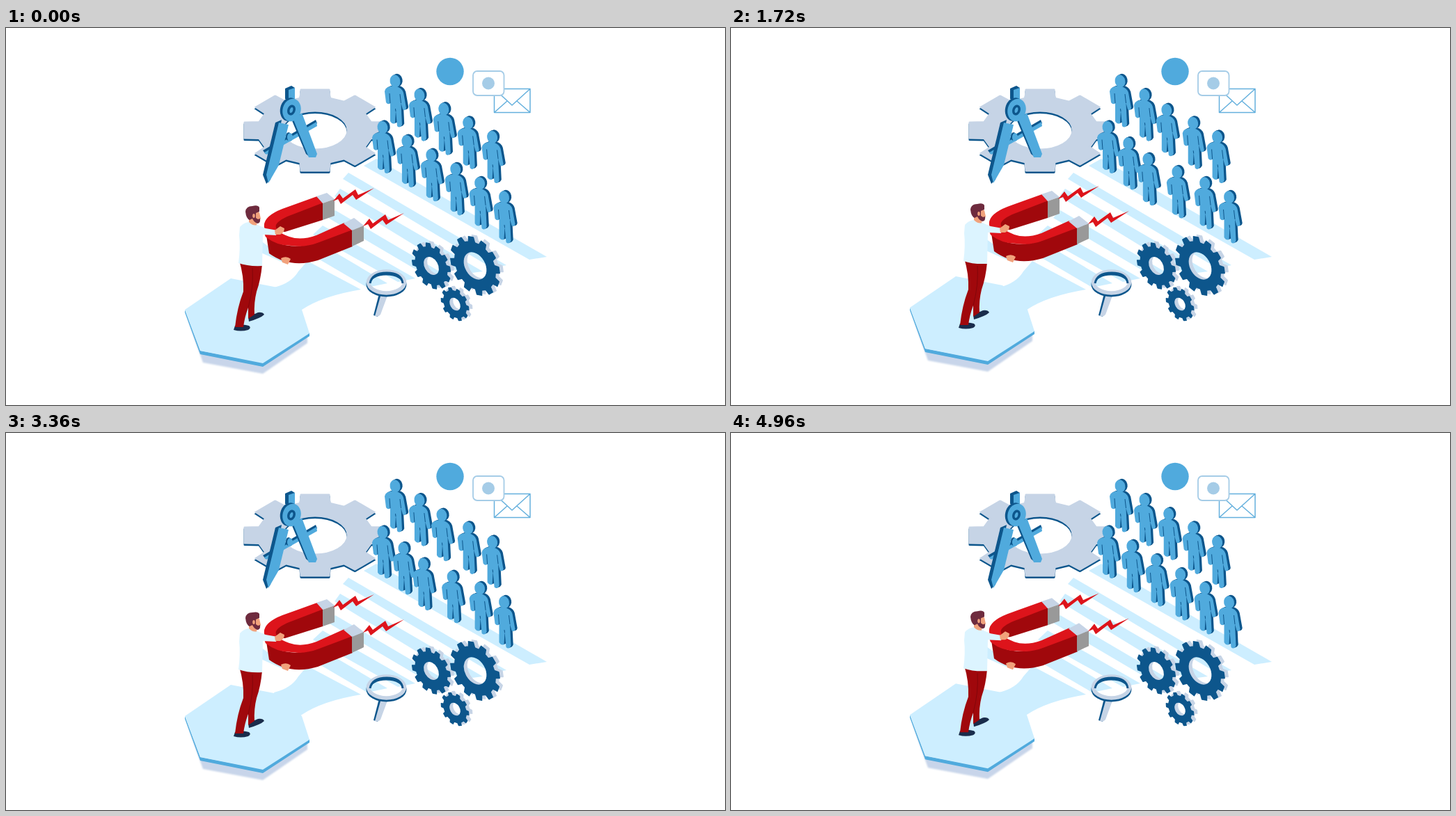
Write an HTML page that moves like this. It is 1033x542 px and loops after 5 s.

```html
<!DOCTYPE html>
<html lang="en">
<head>
<meta charset="utf-8">
<title>Magnet</title>
<style>
html, body { margin: 0; width: 100%; height: 100%; overflow: hidden; background: #fff; }
svg { display: block; width: 100%; height: 100%; }
.ice { fill: #cdeeff; }
.sky { fill: #50aadd; }
.navy { fill: #0d568c; }
.mist { fill: #c6d4e6; }
.red { fill: #dd141b; }
.wine { fill: #a0080c; }
.skin { fill: #f1a27c; }
.hair { fill: #6e2b3e; }
.shoe { fill: #1a2c4b; }
.line { fill: #fff; stroke: #64b0dd; stroke-width: 1.5; stroke-linejoin: round; }
</style>
</head>
<body>
<svg viewBox="0 0 1033 542">
  <defs>
    <g id="shape">
      <ellipse cx="-1" cy="10.500" rx="7.400" ry="9.200" transform="rotate(-12 -1 10.500)"/>
      <path d="M-13 20Q-6 16 0 18Q9 20 11 27L15 49Q14 54 10 51L7.500 42L9 73Q6 79 2 75L0 53L-1 71Q-5 73 -8 68L-8 42Q-11 45 -14 41L-16 25Q-15 21 -13 20Z"/>
    </g>
    <g id="person">
      <use href="#shape" x="3.200" y="-1.500" class="navy"/>
      <use href="#shape" x="1.500" y="-.8" class="navy"/>
      <use href="#shape" class="sky"/>
      <path d="M-9 28L-8 42M6 29L7.500 42M-.5 50L0 54" fill="none" stroke="#0d568c" stroke-width="1"/>
    </g>
    <path id="bolt" class="red" d="M470 249L479 238L484 245L502 232L506 240L529 230L503 247L498 240L481 253L477 246Z"/>
    <filter id="soft" x="-10%" y="-20%" width="120%" height="140%"><feGaussianBlur stdDeviation="1.3"/></filter>
  </defs>

  <g class="ice">
    <path d="M514 198L532 188L777 329L752 333Z"/>
    <path d="M492 208L719 341L698 345L484 217Z"/>
    <path d="M480 231L685 350L655 354L472 242Z"/>
    <path d="M473 262L633 356L609 359L463 273Z"/>
    <path d="M455 284L588 360L563 365L441 297Z"/>
    <path d="M448 308L548 367L519 373L437 325Z"/>
    <path d="M385 373Q410 367 420 350L433 335L510 376Q455 385 425 405L400 420Z"/>
  </g>

  <g id="disc"></g>

  <g id="compass">
    <path class="navy" d="M369 176L445 132L447 137L373 181Z"/>
    <path class="sky" d="M371 179L446 135L447 141L374 182Z"/>
    <path class="navy" d="M410 131L417 126L437 186L431 181Z"/>
    <path class="sky" d="M413 132L425 122L447 181L445 186L435 186Z"/>
    <path class="navy" d="M387 136L396 132L380 218L374 224L369 211Z"/>
    <path class="sky" d="M392 136L406 139L392 197L377 223L374 211Z"/>
    <ellipse class="navy" cx="406" cy="156" rx="4" ry="6"/>
    <ellipse class="sky" cx="408" cy="157" rx="4" ry="6"/>
    <path class="navy" d="M401 87L410 83L415 86L405 104L401 102Z"/>
    <path class="sky" d="M406 89L415 86L415 106L406 106Z"/>
    <ellipse class="navy" cx="407" cy="117" rx="13" ry="17" transform="rotate(14 407 117)"/>
    <ellipse class="sky" cx="410.500" cy="118" rx="13" ry="16.500" transform="rotate(14 410.500 118)"/>
    <ellipse cx="410" cy="118" rx="4" ry="6" transform="rotate(18 410 118)" fill="#50aadd" stroke="#0d568c" stroke-width="3.500"/>
  </g>

  <circle class="sky" cx="638" cy="62.500" r="19.700"/>
  <path class="line" d="M701.500 87.500H753V121.500H701.500ZL727 111L753 87.500M701.500 121.500L720 105M753 121.500L734 105"/>
  <rect x="671" y="62" width="44.500" height="35" rx="6" fill="#fff" stroke="#a5cce7" stroke-width="1.800"/>
  <circle cx="693" cy="79.500" r="9" fill="#a5cce7"/>

  <g id="crowd"></g>
  <g id="cogs"></g>

  <g id="lens">
    <path class="navy" d="M536 382L543 384L534 415L528 413Z"/>
    <path class="mist" d="M539 382L548 385L538 412Q535 416 530 414Z"/>
    <ellipse cx="546.500" cy="368.500" rx="26.500" ry="15.500" fill="none" stroke="#0d568c" stroke-width="5"/>
    <ellipse cx="546.500" cy="365.500" rx="26" ry="15.500" fill="none" stroke="#c6d4e6" stroke-width="5.500"/>
    <path d="M523 367Q526 352 547 352Q568 352 570 367" fill="none" stroke="#0d568c" stroke-width="3"/>
  </g>

  <g id="float">
    <path d="M259 414L283 481L369 497L433 453V438L369 474L270 440Z" fill="#c8d5ea" filter="url(#soft)"/>
    <path class="sky" d="M257 405L279 464L369 481L436 438V443L369 487L279 469L257 409Z"/>
    <path class="ice" d="M323 360L390 373L425 405L436 439L369 482L279 464L257 405Z"/>

    <path class="shoe" d="M348 415Q357 411 362 409Q369 408 371 412Q366 417 349 422ZM329 428Q340 425 349 428Q353 431 348 434Q337 437 327 434Z"/>
    <path class="wine" d="M335 334L368 340Q366 362 360 379Q356 395 357 412L348 418L348 402Q343 415 341 430L329 430Q332 402 341 379Q342 357 335 334Z"/>
    <path d="M354 345Q356 372 348 402" fill="none" stroke="#83060a" stroke-width="1"/>

    <path class="ice" d="M362 303L396 328L398 337L364 322Z"/>
    <path class="wine" d="M455 251Q400 268 387 281L387 293L401 293L455 276Z"/>
    <path class="wine" d="M374 298Q400 322 445 309L498 289V314L448 334Q408 346 378 324Z"/>
    <path class="red" d="M447 242L397 260Q369 271 371 286Q371 300 374 301Q389 313 410 313Q430 316 450 308L498 290L486 280L446 298Q424 306 407 300Q385 292 388 283Q392 275 412 268L456 251Z"/>
    <path class="mist" d="M446 242L461 237L472 246L455 252ZM485 281L500 273L514 284L497 291Z"/>
    <path fill="#999" d="M455 252L472 246V270L455 276ZM497 291L514 284V306L497 314Z"/>
    <use href="#bolt"/>
    <use href="#bolt" x="43" y="36"/>

    <path class="skin" d="M349 270L361 272L360 286L349 285ZM357 263L364 265L366 274L362 280L356 278Z"/>
    <path class="hair" d="M344 264Q345 256 354 256Q362 254 364 258L364 264L359 266L359 273L362 275L365 274Q366 281 361 281Q356 279 354 274L350 276Q345 274 344 264Z"/>
    <ellipse class="skin" cx="356" cy="270" rx="1.800" ry="3"/>
    <path fill="#dcf4ff" d="M336 286Q341 280 349 279Q355 285 361 283L373 288L390 291L388 298L369 297L368 342Q348 343 334 338Q337 315 335 298Z"/>
    <path class="skin" d="M386 291L394 285L400 288Q400 294 394 297L387 297ZM395 331Q403 327 409 332L405 340L397 337Z"/>
  </g>
</svg>
<script>
const LOOP = 5000, TAU = Math.PI * 2;
const $ = id => document.getElementById(id);

function add(parent, tag, attrs) {
  const el = document.createElementNS('http://www.w3.org/2000/svg', tag);
  for (const k in attrs) el.setAttribute(k, attrs[k]);
  parent.appendChild(el);
  return el;
}

// Toothed ring, centred on 0,0
function ring(teeth, outer, root, hole, half, base) {
  const pts = [];
  for (let i = 0; i < teeth; i++) {
    const a = i * TAU / teeth, c = Math.cos(a), s = Math.sin(a);
    for (const [r, w] of [[root, -base], [outer, -half], [outer, half], [root, base]])
      pts.push((r * c - w * s).toFixed(2) + ' ' + (r * s + w * c).toFixed(2));
  }
  return `M${pts.join('L')}ZM${hole} 0A${hole} ${hole} 0 1 0 ${-hole} 0A${hole} ${hole} 0 1 0 ${hole} 0Z`;
}

function gear(parent, d, cls, transform, stroke, width) {
  add(parent, 'path', { d, class: cls, transform, 'fill-rule': 'evenodd',
    stroke, 'stroke-width': width, 'stroke-linejoin': 'round' });
}

const plate = ring(8, 101, 80, 47, 20, 21);
gear($('disc'), plate, 'navy', 'translate(444 149.5) scale(1 .58)', '#0d568c', 3);
gear($('disc'), plate, 'mist', 'translate(444 147) scale(1 .58)', '#c6d4e6', 3);

for (const [x, y, r, hole, teeth] of [[611, 342, 35, 15, 12], [674, 342, 45, 22, 12], [645, 397, 25, 11, 10]]) {
  const d = ring(teeth, r, r * .82, hole, r * .1, r * .13);
  const tilt = ' rotate(-30) scale(.69 1)';
  gear($('cogs'), d, 'mist', `translate(${x + 5} ${y - 2})` + tilt, '#c6d4e6', 2);
  gear($('cogs'), d, 'navy', `translate(${x} ${y})` + tilt, '#0d568c', 2);
}

// Row starts, plus the pull on each person that moves
const rows = [
  { x: 560, y: 66, n: 5, pull: { 2: [-4, 2] } },
  { x: 542, y: 132.5, n: 6, pull: { 1: [-7, 4.5], 2: [-16, 8], 3: [-6.5, 5.5] } }
];
const movers = [];
for (const row of rows) {
  for (let i = 0; i < row.n; i++) {
    const x = row.x + i * 34.9, y = row.y + i * 20.1;
    const el = add($('crowd'), 'use', { href: '#person', transform: `translate(${x} ${y})` });
    if (row.pull[i]) movers.push({ el, x, y, pull: row.pull[i] });
  }
}

function draw(t) {
  const bob = -3 * (Math.sin(TAU * (t - 100) / LOOP) + .125);
  $('float').setAttribute('transform', `translate(0 ${bob.toFixed(3)})`);
  const k = Math.min(1, Math.min(t, LOOP - t) / 2300);
  for (const { el, x, y, pull } of movers)
    el.setAttribute('transform', `translate(${x + pull[0] * k} ${y + pull[1] * k})`);
}

const start = performance.now();
function tick() {
  const t = (performance.now() - start) % LOOP;
  draw(Math.floor(t / 40) * 40);
  requestAnimationFrame(tick);
}
tick();
</script>
</body>
</html>
```
